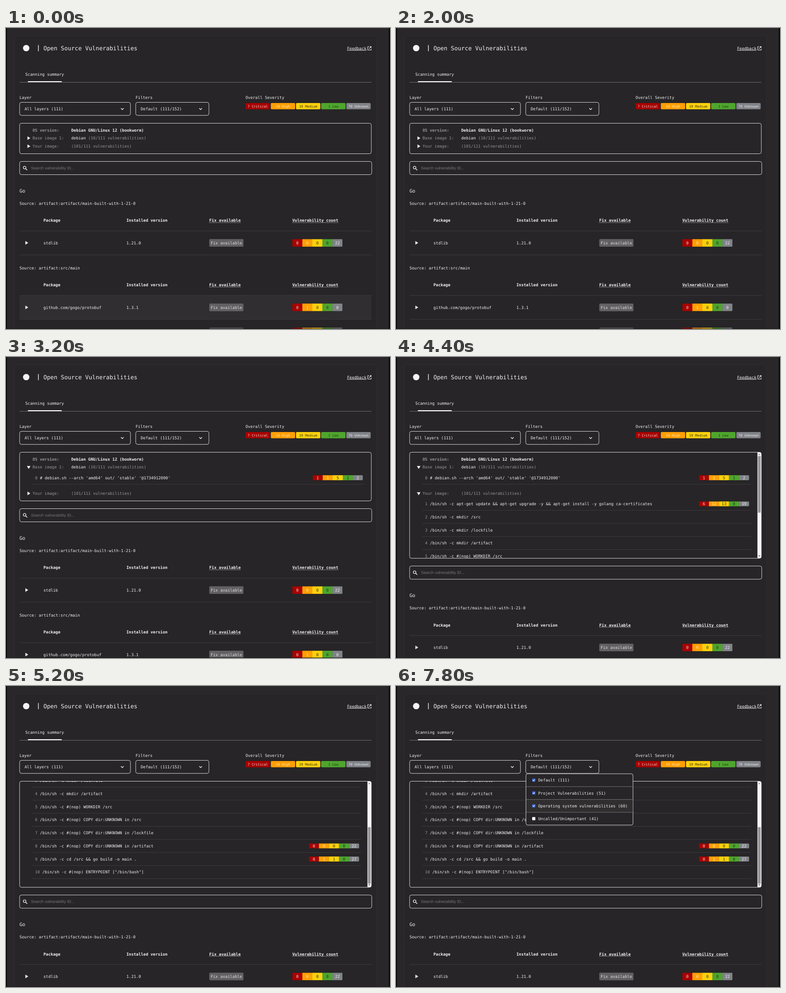
Write an HTML page that moves like this. It is 846 by 662 pixels and loops after 8000 ms.

```html
<!DOCTYPE html>
<html>
<head>
<meta charset="utf-8">
<title>Scanning summary</title>
<style>
  html, body { margin: 0; width: 100%; height: 100%; overflow: hidden; background: #292729; }
  svg { display: block; }
  text { font-family: "DejaVu Sans Mono", monospace; white-space: pre; text-rendering: geometricPrecision; }
</style>
</head>
<body>
<svg id="stage" width="846" height="662" viewBox="0 0 846 662"></svg>
<script>
const LOOP = 8000, STEP = 200;
const OPEN_BASE = 2200, OPEN_IMAGE = 3400, SCROLL_START = 4400, SCROLL_TIME = 786, OPEN_FILTER = 7000;
const MAX_SCROLL = 172.5, ROW = 28.75, SIZE = 8.85;
const BG = '#272527', WHITE = '#f2f2f2', GREY = '#989798', LINE = '#dcdcdc', RULE = '#3f3d3f';
const SEVERITY = [
  ['#a90000', '#f0dede'], ['#ff9f05', '#ffe6b8'], ['#fbd10c', '#3a3414'],
  ['#4fa52e', '#1d3a16'], ['#808388', '#eeeeee']
];
const LAYERS = [
  ['apt-get update && apt-get upgrade -y && apt-get install -y golang ca-certificates', [6, 12, 13, 0, 19]],
  ['mkdir /src'], ['mkdir /lockfile'], ['mkdir /artifact'],
  ['#(nop) WORKDIR /src'], ['#(nop) COPY dir:UNKNOWN in /src'],
  ['#(nop) COPY dir:UNKNOWN in /lockfile'],
  ['#(nop) COPY dir:UNKNOWN in /artifact', [0, 0, 0, 0, 22]],
  ['cd /src && go build -o main .', [0, 1, 1, 0, 27]],
  ['#(nop) ENTRYPOINT ["/bin/bash"]']
];

const escapeText = s => String(s).replace(/&/g, '&amp;').replace(/</g, '&lt;');

// y is the vertical centre of the capitals
const text = (x, y, s, fill = WHITE, size = SIZE, extra = '') =>
  `<text x="${x}" y="${y + size * 0.36}" fill="${fill}" font-size="${size}" ${extra}>${escapeText(s)}</text>`;
const bold = (x, y, s, fill = WHITE) => text(x, y, s, fill, SIZE, 'font-weight="700"');
const centred = (x, y, s, fill, size) => text(x, y, s, fill, size, 'text-anchor="middle"');
const rect = (x, y, w, h, fill, r = 0, extra = '') =>
  `<rect x="${x}" y="${y}" width="${w}" height="${h}" rx="${r}" fill="${fill}" ${extra}/>`;
const box = (x, y, w, h, fill = 'none') => rect(x, y, w, h, fill, 4, `stroke="${LINE}"`);
const path = (d, stroke, width = 1, extra = '') =>
  `<path d="${d}" fill="none" stroke="${stroke}" stroke-width="${width}" ${extra}/>`;
const rule = (x1, x2, y, color = RULE, extra = '') => path(`M${x1} ${y}H${x2}`, color, 1, extra);
const shape = (d, fill) => `<path d="${d}" fill="${fill}"/>`;
const group = (y, content) => `<g transform="translate(0 ${y})">${content}</g>`;

const arrow = (x, y, open) =>
  shape(open ? `M${x - 4} ${y - 2.5}h8l-4 6.5z` : `M${x - 2.7} ${y - 4}v8l6.3 -4z`, WHITE);
const chevron = (x, y) => path(`M${x - 3} ${y - 1.5}l3 3l3 -3`, WHITE, 1.4);

function counts(x, y, h, values) {
  const w = 22.1, id = `c${Math.round(x)}_${Math.round(y * 10)}`;
  const cells = values.map((v, i) =>
    rect(x + i * w, y - h / 2, w + 0.1, h, SEVERITY[i][0]) +
    centred(x + (i + 0.5) * w, y, v, SEVERITY[i][1])).join('');
  return `<clipPath id="${id}">${rect(x, y - h / 2, w * 5, h, '#fff', 2)}</clipPath>` +
    `<g clip-path="url(#${id})">${cells}</g>`;
}

function header() {
  const labels = ['7 Critical', '14 High', '19 Medium', '1 Low', '70 Unknown'];
  return '<circle cx="44.5" cy="44.3" r="7" fill="#f4f4f4"/>' +
    rect(70.7, 37.5, 1.4, 13.5, WHITE) +
    text(82.5, 44.3, 'Open Source Vulnerabilities', WHITE, 12.74) +
    text(751.5, 44.5, 'Feedback') + rule(751.5, 794, 49, WHITE) +
    path('M800 41h-3v7.5h7.5v-3M801.5 40.8h3v3M804.3 41l-4.6 4.6', WHITE, 1.1) +
    text(42.5, 102, 'Scanning summary') +
    rule(30, 805, 119.4, '#747374') + rect(48, 117, 75, 2, '#fff', 1) +
    text(29.7, 152.5, 'Layer') + box(30, 163.5, 244.2, 28.7) +
    text(41, 178, 'All layers (111)') + chevron(256.2, 178) +
    text(285.5, 152.5, 'Filters') + box(285.8, 163.5, 161.2, 28.7) +
    text(296.8, 178, 'Default (111/152)') + chevron(428.8, 178) +
    text(527.8, 152.5, 'Overall Severity') +
    labels.map((label, i) => {
      const x = 528 + i * 55.45;
      return rect(x, 165, 53.6, 13.8, SEVERITY[i][0], 2) +
        centred(x + 26.8, 172, label, SEVERITY[i][1], 7.4);
    }).join('');
}

function layer(index, command, values, y, inset) {
  const prefix = index + ' ';
  return text(64, y, prefix, GREY) +
    text(64 + prefix.length * SIZE * 0.602, y, command) +
    (values ? counts(675.7 - inset, y, 11, values) : '') +
    rule(58.5, 791 - inset, y + 14.3, '#545254', 'stroke-dasharray="1 1"');
}

function scrollbar(scroll) {
  return rect(796.3, 209, 9, 234, '#f6f6f6') +
    rect(797.4, 218 + scroll * 92.5 / MAX_SCROLL, 6, 124.3, '#979797') +
    shape('M798.2 215.5h4.4l-2.2 -2.6z', '#777') + shape('M798.2 436.5h4.4l-2.2 2.6z', '#555');
}

function layerPanel(baseOpen, imageOpen, scroll, height) {
  const inset = imageOpen ? 8.3 : 0;
  const imageY = baseOpen ? 300 : 260;
  const content = bold(58.5, 225, 'OS version:', GREY) +
    bold(143.8, 225, 'Debian GNU/Linux 12 (bookworm)') +
    arrow(50, 242.3, baseOpen) + text(58.5, 242.3, 'Base image 1:', GREY) +
    text(143.8, 242.3, 'debian') + text(181.2, 242.3, '(10/111 vulnerabilities)', GREY) +
    (baseOpen ? layer(0, "# debian.sh --arch 'amd64' out/ 'stable' '@1734912000'", [1, 1, 5, 1, 2], 265.5, inset) : '') +
    arrow(50, imageY, imageOpen) + text(58.5, imageY, 'Your image:', GREY) +
    text(143.8, imageY, '(101/111 vulnerabilities)', GREY) +
    (imageOpen ? LAYERS.map(([command, values], i) =>
      layer(i + 1, '/bin/sh -c ' + command, values, 323 + i * ROW, inset)).join('') : '');
  return `<clipPath id="panel">${rect(30, 209.5, 775, height, '#fff', 4)}</clipPath>` +
    `<g clip-path="url(#panel)">${group(-scroll, content)}${imageOpen ? scrollbar(scroll) : ''}</g>` +
    box(30, 209.5, 774.8, height);
}

function packageRow(y, name, version, values) {
  return arrow(45.4, y, false) + text(82.5, y, name) + text(265.3, y, version) +
    rect(447.8, y - 8.3, 75.4, 16.8, '#626063', 2) + centred(485.5, y, 'Fix available', '#dedede') +
    counts(630.8, y, 16.6, values) + rule(30, 806, y + 26.4);
}

function table(y, source) {
  const underlined = (x, label) => bold(x, y + 37.2, label) +
    rule(x, x + label.length * SIZE * 0.602, y + 42, WHITE, 'stroke-dasharray="1 1"');
  return text(29.7, y, 'Source: ' + source) +
    bold(82.5, y + 37.2, 'Package') + bold(265.3, y + 37.2, 'Installed version') +
    underlined(447.8, 'Fix available') + underlined(630.8, 'Vulnerability count') +
    rule(30, 806, y + 60.4);
}

function results(hovered) {
  return box(30, 293.5, 775.8, 29) +
    '<circle cx="41" cy="307" r="2.9" fill="none" stroke="#f2f2f2" stroke-width="1.3"/>' +
    path('M43.1 309.1l3.6 3.6', WHITE, 1.5) +
    text(55, 308, 'Search vulnerability ID...', '#777577', SIZE,
      'style="font-family:\'Liberation Sans\',Arial,sans-serif"') +
    text(29.7, 357.7, 'Go', WHITE, 10.6) +
    table(386, 'artifact:artifact/main-built-with-1-21-0') +
    packageRow(472.6, 'stdlib', '1.21.0', [0, 0, 0, 0, 22]) +
    (hovered ? rect(30, 588.5, 775, 52, '#302e30') : '') +
    table(527.8, 'artifact:src/main') +
    packageRow(614.4, 'github.com/gogo/protobuf', '1.3.1', [0, 1, 0, 0, 0]) +
    packageRow(667.5, '', '', ['', '', '', '', '']);
}

function filterMenu() {
  const options = ['Default (111)', 'Project Vulnerabilities (51)',
    'Operating system vulnerabilities (60)', 'Uncalled/Unimportant (41)'];
  return box(286.3, 193, 235.8, 112.8, BG) + rect(287, 249.5, 234.5, 28, '#302e2f') +
    options.map((label, i) => {
      const y = 207.2 + i * 28.25, checked = i < 3;
      return rect(300, y - 3.7, 7, 7, checked ? '#3e68d0' : '#fff', 1) +
        (checked ? path(`M301.5 ${y}l1.4 1.5l2.7 -3.2`, '#fff', 1.1) : '') +
        text(313.3, y, label) + (checked ? rule(287, 521.5, y + 14.1, '#777577') : '');
    }).join('');
}

function scene(t) {
  const baseOpen = t >= OPEN_BASE, imageOpen = t >= OPEN_IMAGE;
  const p = Math.min(1, Math.max(0, (t - SCROLL_START) / SCROLL_TIME));
  const scroll = MAX_SCROLL * p * p * (3 - 2 * p);
  const shift = imageOpen ? 166.2 : baseOpen ? 40 : 0;
  return rect(0, 0, 846, 662, '#292729') +
    rect(18.5, 17, 798, 660, BG, 3, 'stroke="#302e30"') +
    header() +
    layerPanel(baseOpen, imageOpen, scroll, 67 + shift) +
    group(shift, results(t < 400)) +
    (t >= OPEN_FILTER ? filterMenu() : '') +
    rect(0, 0, 2, 662, '#050505') + rect(843.5, 0, 2.5, 662, '#080808') +
    rect(0, 661, 846, 1, '#171315');
}

const stage = document.getElementById('stage');
let start, shown = -1;
function tick(now) {
  start ??= now;
  const t = Math.floor((now - start) % LOOP / STEP) * STEP;
  if (t !== shown) stage.innerHTML = scene(shown = t);
  requestAnimationFrame(tick);
}
stage.innerHTML = scene(0);
requestAnimationFrame(tick);
</script>
</body>
</html>
```
